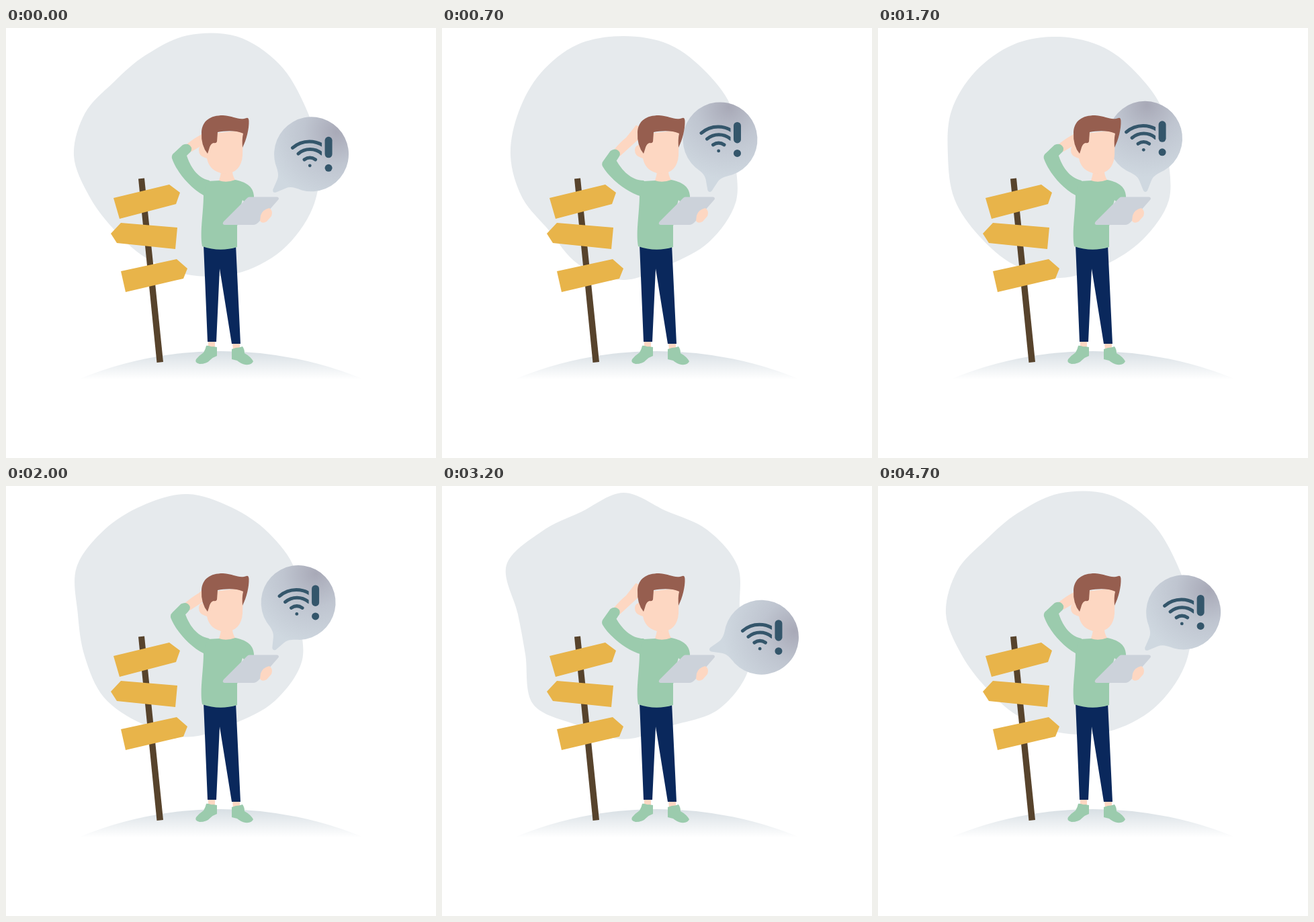
Write an HTML page that moves like this. It is 640 px wide and 640 px high and loops after 4.8 s.

```html
<!DOCTYPE html>
<html lang="en">
<head>
<meta charset="utf-8">
<title>Lost connection</title>
<style>
  html, body { margin: 0; width: 100%; height: 100%; overflow: hidden; background: #fff; }
  svg { display: block; width: 100vw; height: 100vh; }
  .skin { fill: #fdd7c2; }
  .green { fill: #9bcbad; }
  .sign { fill: #e8b44a; }
  .ink { fill: #34566b; }
</style>
</head>
<body>
<svg viewBox="0 0 640 640">
  <defs>
    <linearGradient id="hill" x1="0" y1="482" x2="0" y2="523" gradientUnits="userSpaceOnUse">
      <stop offset="0" stop-color="#d9e0e5"/>
      <stop offset="1" stop-color="#fff"/>
    </linearGradient>
    <radialGradient id="shade" cx="3" cy="-130" r="108" gradientUnits="userSpaceOnUse">
      <stop offset="0" stop-color="#a8a9b7"/>
      <stop offset=".45" stop-color="#bfc5d0"/>
      <stop offset="1" stop-color="#cfd8e0"/>
    </radialGradient>
    <clipPath id="cut"><rect x="-40" y="-40" width="55.5" height="80"/></clipPath>
  </defs>

  <path id="blob" fill="#e6eaed"/>
  <path d="M100 526A559 559 0 0 1 540 526Z" fill="url(#hill)"/>

  <path d="M197 224.5L206 223.5L234 497L224.5 498Z" fill="#57432c"/>
  <g class="sign">
    <path d="M160 253L243 233L259 245L253 262L169 284Z"/>
    <path d="M156 306L171 290L255 297L252 329L165 320Z"/>
    <path d="M171 362L254 344L270 358L264 373L178 393Z"/>
  </g>

  <g id="bubble" fill="url(#shade)">
    <path d="M0 -135.2A55.5 55.5 0 0 1 28 -31.8C18 -27 12 -24 9 -17L3 -2Q0 2 -3 -2L-9 -17C-12 -24 -18 -27 -28 -31.8A55.5 55.5 0 0 1 0 -135.2Z"/>
  </g>
  <g id="icon" class="ink">
    <g clip-path="url(#cut)" fill="none" stroke="#34566b" stroke-width="5" stroke-linecap="round">
      <path d="M-28 -9.5A38 38 0 0 1 22 -9.5"/>
      <path d="M-19.5 -.8A27 27 0 0 1 15.5 -.8"/>
      <path d="M-10.5 8Q-2.2 2.4 6 8"/>
    </g>
    <circle cx="-2.3" cy="17" r="2.4"/>
    <rect x="20" y="-26" width="11" height="31.5" rx="5.5"/>
    <circle cx="25.5" cy="20.5" r="5.5"/>
  </g>

  <path class="skin" d="M301 465H311V477H301ZM337 468H348V479H338Z"/>
  <path fill="#0a285c" d="M294 322H342L349 470H336L318 358L313 467H300Z"/>
  <path class="green" d="M298 473C302 472 305 475 308 474L314 475V488Q308 490 304 494Q299 500 288 500Q280 498 283 493Q288 487 294 483Q297 478 298 473Z"/>
  <path class="green" d="M336 478L342 476Q347 476 352 474Q355 478 355 484Q364 489 368 496Q366 502 356 501Q350 500 344 495L336 493Z"/>

  <g id="arm">
    <path class="skin" d="M262 177L269 173Q280 164 290 159L308 144L318 150L308 165L276 184Z"/>
    <path class="green" d="M294 249C272 237 253 212 247 194Q246 189 250 186L263 174Q272 170 276 178Q277 183 273 186L269 190C274 205 284 223 303 227L306 245Z"/>
  </g>
  <path class="green" d="M300 228L318 227L341 226C356 229 368 235 369 250V262L344 294V326Q318 334 292 325C288 305 294 275 294 248Z"/>
  <path class="skin" d="M318 205L320 215Q319 221 317 227Q328 231 341 226Q336 218 337 208Z"/>
  <path class="skin" d="M300 158L353 152L352 190Q350 216 325 217Q303 214 299 194L296 193Q287 190 287 182Q287 175 293 174Z"/>
  <path fill="#965e4f" d="M300 187Q290 175 291 155C292 138 304 130 323 130C340 131 346 138 358 134Q361 133 361.500 138C362 150 358 166 352 178Q351 166 353 157C342 152 326 153 315 155L314 169Q313 172 309 171Q304 172 302 181Z"/>
  <path fill="#e6eaed" d="M352 256L355 259L350 263Z"/>
  <path fill="#ccd2da" d="M362 251.500H404Q408 253 404 257L376 289Q372 293 368 293H325Q321 292 324 288L357 255Q360 251.500 362 251.500Z"/>
  <path class="skin" d="M379 279Q382 270 392 268Q398 272 395 280L388 288Q381 292 378 287Z"/>
</svg>

<script>
const LOOP = 4800, STEP = 100;
const $ = id => document.getElementById(id);
const mix = (a, b, p) => a + (b - a) * p;

const linear = p => p;
const smooth = p => p * p * (3 - 2 * p);

// cubic-bezier(.25, .1, .25, 1)
function ease(p) {
  let lo = 0, hi = 1, s;
  for (let i = 0; i < 24; i++) {
    s = (lo + hi) / 2;
    if (.75 * s * (1 - s) + s ** 3 < p) lo = s; else hi = s;
  }
  return .3 * s * (1 - s) ** 2 + 3 * s * s * (1 - s) + s ** 3;
}

// Radii around (270, 190), clockwise from the right in equal angles
const egg    = [197, 202, 199, 190, 177, 164, 155, 158, 169, 165, 155, 162, 179, 192, 193, 190];
const pebble = [166, 181, 181, 176, 185, 175, 157, 163, 168, 169, 174, 179, 178, 179, 175, 176];
const disc   = [162, 176, 176, 176, 182, 176, 169, 169, 166, 174, 177, 179, 177, 174, 168, 168];
const star   = [173, 203, 201, 181, 187, 180, 191, 158, 157, 189, 173, 164, 180, 165, 176, 184];

// Tracks of [time, value, easing towards the next key]
const blobTrack = [[0, egg, linear], [700, pebble, smooth], [1700, disc, ease], [3140, star, ease], [LOOP, egg]];
const tiltTrack = [[0, 45.2, ease], [1650, -1.8, ease], [3140, 77, ease], [LOOP, 45.2]];
const armTrack = [[0, 0, smooth], [800, 1, smooth], [1600, 0, smooth], [3050, 1, smooth], [4700, 0, linear], [LOOP, 0]];

function sample(track, t) {
  const i = track.findIndex((key, n) => t < track[n + 1][0]);
  const [t0, a, curve] = track[i], [t1, b] = track[i + 1];
  const p = curve((t - t0) / (t1 - t0));
  return Array.isArray(a) ? a.map((v, k) => mix(v, b[k], p)) : mix(a, b, p);
}

function blobPath(radii) {
  const n = radii.length;
  const pts = radii.map((r, k) => {
    const a = k * 2 * Math.PI / n;
    return [270 + r * Math.cos(a), 190 + r * Math.sin(a)];
  });
  const at = k => pts[(k + n) % n];
  const handle = (k, sign) => at(k).map((v, d) => v + sign * (at(k + 1)[d] - at(k - 1)[d]) / 6);
  return `M${pts[0]}` + pts.map((_, k) => `C${handle(k, 1)} ${handle(k + 1, -1)} ${at(k + 1)}`).join("") + "Z";
}

function draw(now) {
  const t = Math.floor(now % LOOP / STEP) * STEP;
  const tilt = sample(tiltTrack, t), a = tilt * Math.PI / 180;
  $("blob").setAttribute("d", blobPath(sample(blobTrack, t)));
  $("bubble").setAttribute("transform", `translate(398 244) rotate(${tilt})`);
  $("icon").setAttribute("transform", `translate(${398 + 79.7 * Math.sin(a)} ${244 - 79.7 * Math.cos(a)})`);
  $("arm").setAttribute("transform", `rotate(${-12 * sample(armTrack, t)} 302 240)`);
}

const start = performance.now();
function tick() {
  draw(performance.now() - start);
  requestAnimationFrame(tick);
}
tick();
</script>
</body>
</html>
```
